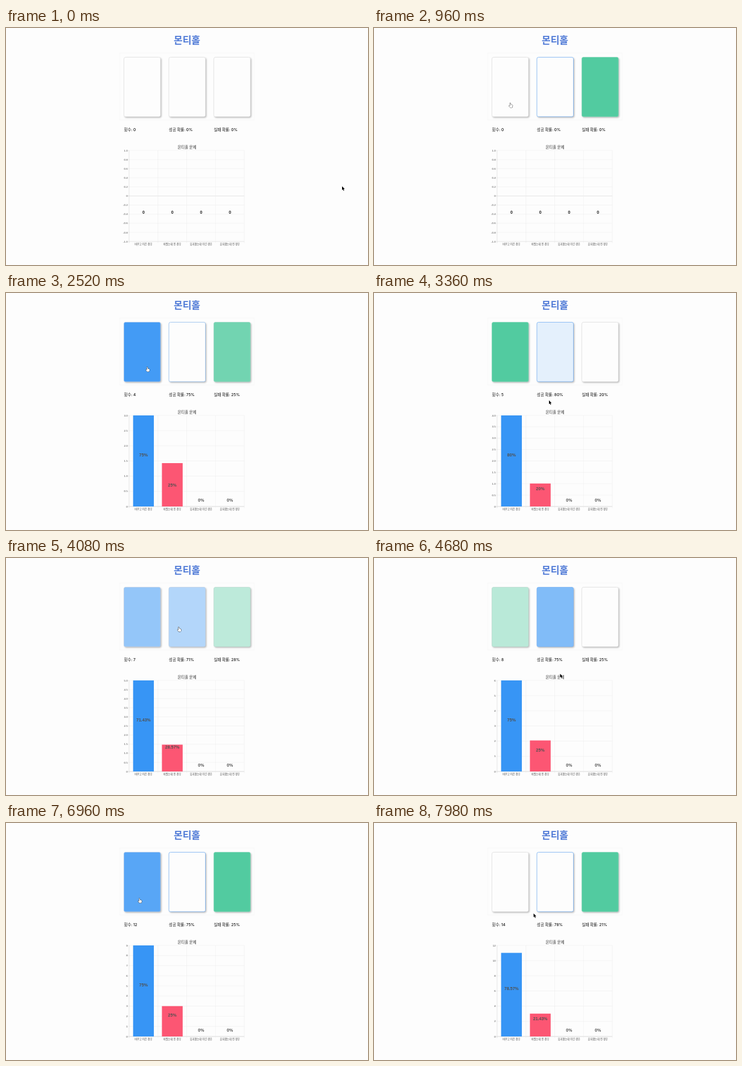
An HTML page with a canvas that plays this animation: 600 px wide and 393 px high, repeating every 8000 ms.

```html
<!DOCTYPE html>
<html lang="ko">
<head>
<meta charset="utf-8">
<style>
html, body { margin: 0; width: 100%; height: 100%; overflow: hidden; background: #fdfdfd; }
canvas { display: block; width: 600px; height: 393px; }
</style>
</head>
<body>
<canvas id="stage"></canvas>
<script>
const W = 600, H = 393, LOOP = 8000, STEP = 60;
const canvas = document.getElementById('stage');
const ctx = canvas.getContext('2d');
const ratio = Math.max(1, window.devicePixelRatio || 1);
canvas.width = W * ratio;
canvas.height = H * ratio;

const KOREAN = 'Inter, "Noto Sans CJK KR", "Noto Sans CJK", sans-serif';
const LATIN = '"Liberation Sans", sans-serif';
const WHITE = [253, 253, 253], BLUE = [55, 149, 245], GREEN = [82, 203, 160];
const EDGE = [226, 226, 226], RING = [124, 180, 245];

const CARD_X = [195.5, 270, 344.5], CARD_Y = 48.5, CARD_W = 60.5, CARD_H = 98.5;
const PLOT = { left: 204, right: 395, top: 203, bottom: 354 };
const SLOT = (PLOT.right - PLOT.left) / 4, BAR_W = SLOT * 0.72;
const BAR_TIME = 680;
const CASES = ['바꾸고 이긴 경우', '바꿨는데 진 경우', '유지했는데 이긴 경우', '유지했는데 진 경우'];

// Every round: pick the middle card, one side opens, switch to the other side.
const SWITCH_AT = [1080, 1535, 2020, 2490, 2960, 3540, 3980, 4400, 4860, 5320, 5920, 6440, 6980, 7550, 8400];
const SWITCH_TO = [0, 0, 2, 0, 2, 2, 0, 2, 2, 0, 2, 0, 0, 2, 0];
const LOST = [0, 6, 8];
const VIA = {
  2: [335, 19], 3: [250, 19], 4: [330, 15], 5: [290, 178, 3360], 6: [245, 18],
  7: [340, 178], 8: [308.5, 192, 4680], 9: [260, 183], 10: [351, 211.5, 5700],
  11: [250, 19], 12: [258, 176], 13: [335, 170], 14: [264.5, 150, 7980]
};
const rounds = SWITCH_AT.map((end, i) => ({
  pick: i ? SWITCH_AT[i - 1] + 150 : 600, end,
  to: SWITCH_TO[i], open: 2 - SWITCH_TO[i], via: VIA[i]
}));

// wins and losses after each round
const scores = [[0, 0]];
for (let i = 0; i < 14; i++) {
  const [won, lost] = scores[i];
  scores.push(LOST.includes(i) ? [won, lost + 1] : [won + 1, lost]);
}

const path = [[240, 174, 3], [420, 235, 92]];
for (const r of rounds) {
  path.push([r.pick - 80, 286, 114], [r.pick + 40, 287, 116]);
  if (r.via) path.push([r.via[2] || r.pick + 170, r.via[0], r.via[1]]);
  const x = r.to ? 372 : 221;
  path.push([r.end - 95, x, 125], [r.end + 20, x, 125]);
}

const clamp = v => Math.max(0, Math.min(1, v));
const ramp = (t, a, b) => clamp((t - a) / (b - a));
const mix = (a, b, k) => a.map((v, i) => v + (b[i] - v) * k);
const css = c => `rgb(${c.map(Math.round).join(',')})`;

function text(str, x, y, font, color, align = 'left') {
  ctx.font = font;
  ctx.fillStyle = color;
  ctx.textAlign = align;
  ctx.fillText(str, x, y);
}

function line(x1, y1, x2, y2, color, width = 0.5) {
  ctx.strokeStyle = color;
  ctx.lineWidth = width;
  ctx.beginPath();
  ctx.moveTo(x1, y1);
  ctx.lineTo(x2, y2);
  ctx.stroke();
}

function roundRect(x, y, w, h, r) {
  ctx.beginPath();
  ctx.moveTo(x + r, y);
  ctx.arcTo(x + w, y, x + w, y + h, r);
  ctx.arcTo(x + w, y + h, x, y + h, r);
  ctx.arcTo(x, y + h, x, y, r);
  ctx.arcTo(x, y, x + w, y, r);
  ctx.closePath();
}

function cardLook(card, t) {
  let blue = 0, green = 0, ring = 0;
  for (const { pick, end, to, open } of rounds) {
    if (card === 1) {
      blue = Math.max(blue, ramp(t, pick - 80, pick) * (1 - ramp(t, pick + 40, pick + 280)));
      ring = Math.max(ring, ramp(t, pick - 80, pick) * (1 - ramp(t, end, end + 120)));
    } else if (card === to) {
      blue = Math.max(blue, ramp(t, end - 120, end) * (1 - ramp(t, end + 20, end + 190)));
    }
    if (card === open) {
      green = Math.max(green, ramp(t, pick + 60, pick + 235) * (1 - ramp(t, end, end + 160)));
    }
  }
  const fill = mix(mix(WHITE, GREEN, green), BLUE, blue);
  const edge = mix(mix(EDGE, mix(WHITE, GREEN, 0.75), green), RING, Math.max(ring, blue * 0.8));
  return { fill: css(fill), edge: css(edge) };
}

function drawCards(t) {
  ctx.strokeStyle = '#f7f7f7';
  ctx.lineWidth = 0.7;
  ctx.strokeRect(188.5, 41.5, 223, 111);
  CARD_X.forEach((x, i) => {
    const { fill, edge } = cardLook(i, t);
    roundRect(x, CARD_Y, CARD_W, CARD_H, 2.5);
    ctx.save();
    ctx.shadowColor = 'rgba(0,0,0,0.32)';
    ctx.shadowBlur = 3 * ratio;
    ctx.shadowOffsetX = ctx.shadowOffsetY = 1.4 * ratio;
    ctx.fillStyle = fill;
    ctx.fill();
    ctx.restore();
    ctx.strokeStyle = edge;
    ctx.lineWidth = 0.8;
    ctx.stroke();
  });
}

function drawStats(count, rates) {
  const font = `500 6.4px ${KOREAN}`;
  const rows = [`횟수: ${count}`, `성공 확률: ${Math.floor(rates[0])}%`, `실패 확률: ${Math.floor(rates[1])}%`];
  rows.forEach((row, i) => text(row, CARD_X[i], 171.4, font, '#111'));
}

function axisFor(score) {
  const max = Math.max(...score);
  if (!max) return { min: -1, max: 1, step: 0.2 };
  const raw = max / 10, unit = 10 ** Math.floor(Math.log10(raw) + 1e-9);
  const step = [1, 2, 5, 10].find(n => n * unit >= raw - 1e-9) * unit;
  return { min: 0, max: Math.ceil(max / step - 1e-9) * step, step };
}

function barHeights(t) {
  let now = [0, 0];
  for (let i = 0; i < 14 && SWITCH_AT[i] <= t; i++) {
    const score = scores[i + 1], top = axisFor(score).max;
    const p = clamp((Math.min(t, SWITCH_AT[i + 1]) - SWITCH_AT[i]) / BAR_TIME);
    const goal = score.map(v => v / top * (PLOT.bottom - PLOT.top));
    now = mix(now, goal, 1 - (1 - p) ** 4);
  }
  return now;
}

function drawChart(t, count, rates) {
  const score = scores[count], axis = axisFor(score);
  const { left, right, top, bottom } = PLOT;
  const height = bottom - top, span = axis.max - axis.min;
  const yOf = v => bottom - (v - axis.min) / span * height;

  text('몬티홀 문제', 300, 199.5, `6.4px ${KOREAN}`, '#333', 'center');
  for (let i = 0; i <= Math.round(span / axis.step); i++) {
    const v = axis.min + i * axis.step, zero = Math.abs(v) < 1e-6, y = yOf(v);
    line(left - 3, y, right, y, zero ? '#cfcfcf' : '#ebebeb');
    const label = zero ? '0' : v.toFixed(axis.step < 0.99 ? 1 : 0);
    text(label, 201.6, y + 1.6, `4.4px ${LATIN}`, '#444', 'right');
  }
  for (let i = 0; i <= 4; i++) {
    const x = left + i * SLOT;
    line(x, top, x, bottom + 2.5, i ? '#ebebeb' : '#cfcfcf');
  }
  line(left, bottom, right, bottom, '#d4d4d4');

  const bars = barHeights(t);
  CASES.forEach((name, i) => {
    const x = left + (i + 0.5) * SLOT;
    if (i < 2 && bars[i] > 0) {
      ctx.fillStyle = i ? '#fc5673' : css(BLUE);
      ctx.fillRect(x - BAR_W / 2, bottom - bars[i], BAR_W, bars[i]);
    }
    const rate = rates[i] || 0;
    const label = count ? `${Number(rate.toFixed(2))}%` : '0';
    const y = (yOf(score[i] || 0) + bottom) / 2 - (count ? 8 : 8.3);
    text(label, x, y, `bold 7px ${LATIN}`, count ? '#505050' : '#222', 'center');
    text(name, x, 359.8, `4.2px ${KOREAN}`, '#444', 'center');
  });
}

function cursorAt(t) {
  if (t < 60) return [557, 262.5];
  if (t < path[0][0]) return null;
  const i = path.findIndex(p => p[0] > t);
  const [a, b] = [path[i - 1], path[i]];
  return mix(a.slice(1), b.slice(1), ramp(t, a[0], b[0]));
}

function shape(points, fill, stroke, width) {
  ctx.beginPath();
  points.forEach(([x, y]) => ctx.lineTo(x, y));
  ctx.closePath();
  ctx.lineJoin = 'round';
  ctx.lineWidth = width;
  ctx.strokeStyle = stroke;
  ctx.fillStyle = fill;
  ctx.stroke();
  ctx.fill();
}

function drawCursor(t) {
  const at = cursorAt(t);
  if (!at) return;
  const [x, y] = at;
  const over = y > CARD_Y && y < CARD_Y + CARD_H && CARD_X.some(c => x > c && x < c + CARD_W);
  ctx.save();
  ctx.translate(x, y);
  if (over) {
    shape([[-0.6, 0], [0.5, 0], [0.9, 2.6], [3.4, 3.2], [4, 4.4], [3.4, 7.4], [0, 7.6],
      [-2.2, 4.6], [-1.5, 4], [-0.2, 5]], '#fff', '#222', 0.9);
  } else {
    shape([[0, 0], [0, 6.3], [1.4, 5.1], [2.5, 7.5], [3.5, 7], [2.5, 4.7], [4.4, 4.5]],
      '#000', '#fff', 0.9);
  }
  ctx.restore();
}

function draw(t) {
  ctx.setTransform(ratio, 0, 0, ratio, 0, 0);
  ctx.fillStyle = css(WHITE);
  ctx.fillRect(0, 0, W, H);
  const count = SWITCH_AT.filter(end => end <= t).length;
  const rates = scores[count].map(v => count ? v / count * 100 : 0);
  text('몬티홀', 300, 25.8, `bold 16px ${KOREAN}`, '#4d78d6', 'center');
  drawCards(t);
  drawStats(count, rates);
  drawChart(t, count, rates);
  drawCursor(t);
}

const start = performance.now();
function tick() {
  const t = (performance.now() - start) % LOOP;
  draw(Math.floor(t / STEP) * STEP);
  requestAnimationFrame(tick);
}
tick();
</script>
</body>
</html>
```
